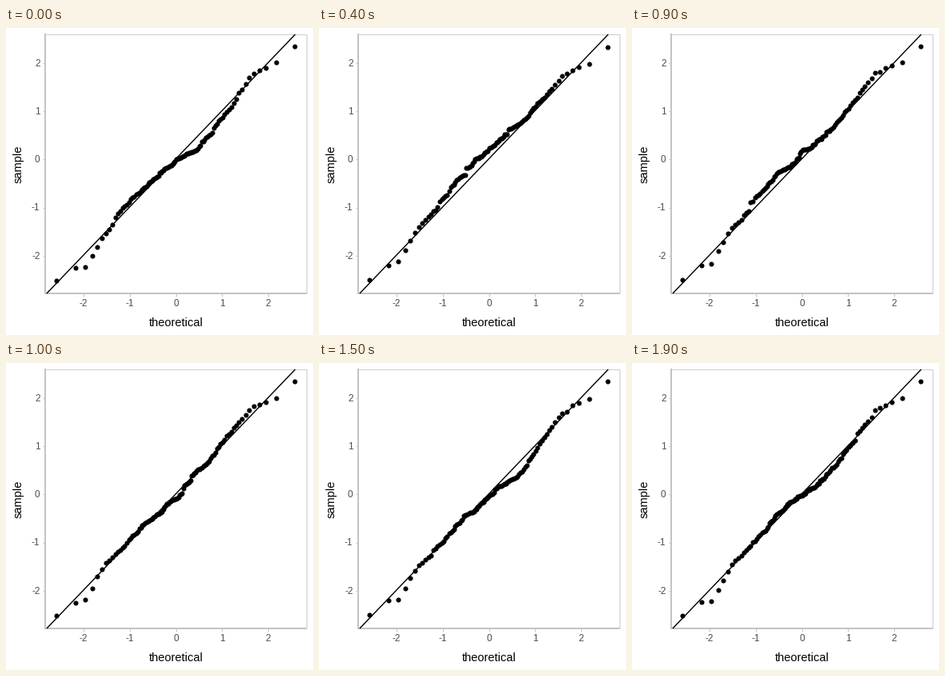
A matplotlib script that plays this animation: 384x384 px, repeating every 2000 ms.

```python
import math

import numpy as np
import matplotlib.pyplot as plt
from matplotlib.animation import FuncAnimation

SIZE, DPI = 384, 96
FRAMES, INTERVAL = 20, 100
PX = 72 / DPI  # points per pixel
LEFT, TOP, RIGHT, BOTTOM = 49, 8, 376, 332
X0, Y0, XSCALE, YSCALE = 212.2, 163.9, 57.75, 60.2
COUNT = 100
FRAME_GREY, AXIS_GREY, TEXT_GREY = "#cccccc", "#c3c3c3", "#4d4d4d"

plt.rcParams["font.family"] = "Liberation Sans"


def to_x(v):
    return X0 + XSCALE * v


def to_y(v):
    return Y0 - YSCALE * v


def normal_quantile(p):
    """Invert the normal distribution by Newton steps."""
    z = 0.0
    for _ in range(40):
        cdf = 0.5 * (1 + math.erf(z / math.sqrt(2)))
        pdf = math.exp(-z * z / 2) / math.sqrt(2 * math.pi)
        z -= (cdf - p) / pdf
    return z


probs = (np.arange(COUNT) + 0.5) / COUNT
theory = np.array([normal_quantile(p) for p in probs])

# Every draw strays from the normal line in the same gentle way.
BEND_X = [-2.58, -2.17, -1.96, -1.55, -0.5, 0.7, 1.6, 2.17, 2.58]
BEND_Y = [0.05, -0.09, -0.26, 0.03, 0.07, -0.08, 0.14, -0.17, -0.24]
center = theory + np.interp(theory, BEND_X, BEND_Y)


def sample(frame):
    """Sorted sample of one draw: uneven gaps make clusters and jumps."""
    rng = np.random.default_rng(frame)
    steps = np.cumsum(rng.exponential(size=COUNT + 1))
    wobble = steps[:-1] / steps[-1] - probs
    wobble[[0, -1]] *= 0.3
    return np.sort(center + 2.1 * wobble)


fig = plt.figure(figsize=(SIZE / DPI, SIZE / DPI), dpi=DPI, facecolor="white")
ax = fig.add_axes([0, 0, 1, 1])
ax.set_xlim(0, SIZE)
ax.set_ylim(SIZE, 0)
ax.axis("off")


def stroke(xs, ys, color, width, z=1):
    ax.plot(xs, ys, color=color, lw=width * PX, zorder=z,
            solid_capstyle="butt", solid_joinstyle="miter")


def label(x, y, text, size, color, **kw):
    ax.text(x, y, text, fontsize=size, color=color, va="baseline", **kw)


# Reference line, cut off at the panel edge
ends = np.array([(Y0 - BOTTOM) / YSCALE, (Y0 - TOP) / YSCALE])
stroke(to_x(ends), to_y(ends), "black", 1.42, 2)

# Panel frame
stroke([LEFT, RIGHT - .5, RIGHT - .5], [TOP - .5, TOP - .5, BOTTOM], FRAME_GREY, 1)
stroke([LEFT, LEFT, RIGHT], [TOP - 1, BOTTOM, BOTTOM], AXIS_GREY, 2)

# Ticks and their labels
for v in range(-2, 3):
    tx, ty = math.floor(to_x(v)) + .5, math.floor(to_y(v)) + .5
    stroke([tx, tx], [BOTTOM, BOTTOM + 3.5], AXIS_GREY, 1)
    stroke([LEFT - 3.5, LEFT], [ty, ty], AXIS_GREY, 1)
    label(to_x(v) + .3, 348, str(v), 8.8, TEXT_GREY, ha="center")
    label(42.5, to_y(v) + 4.3, str(v), 8.8, TEXT_GREY, ha="right")

label(212.7, 373, "theoretical", 11, "black", ha="center")
label(19.6, 170.5, "sample", 11, "black", ha="center",
      rotation=90, rotation_mode="anchor")

dots, = ax.plot([], [], "o", color="black", ms=6.1 * PX, mew=0, zorder=3)


def draw(frame):
    dots.set_data(to_x(theory), to_y(sample(frame)))
    return dots,


anim = FuncAnimation(fig, draw, frames=FRAMES, interval=INTERVAL,
                     init_func=lambda: draw(0), repeat=True, repeat_delay=0)
plt.show()
```
